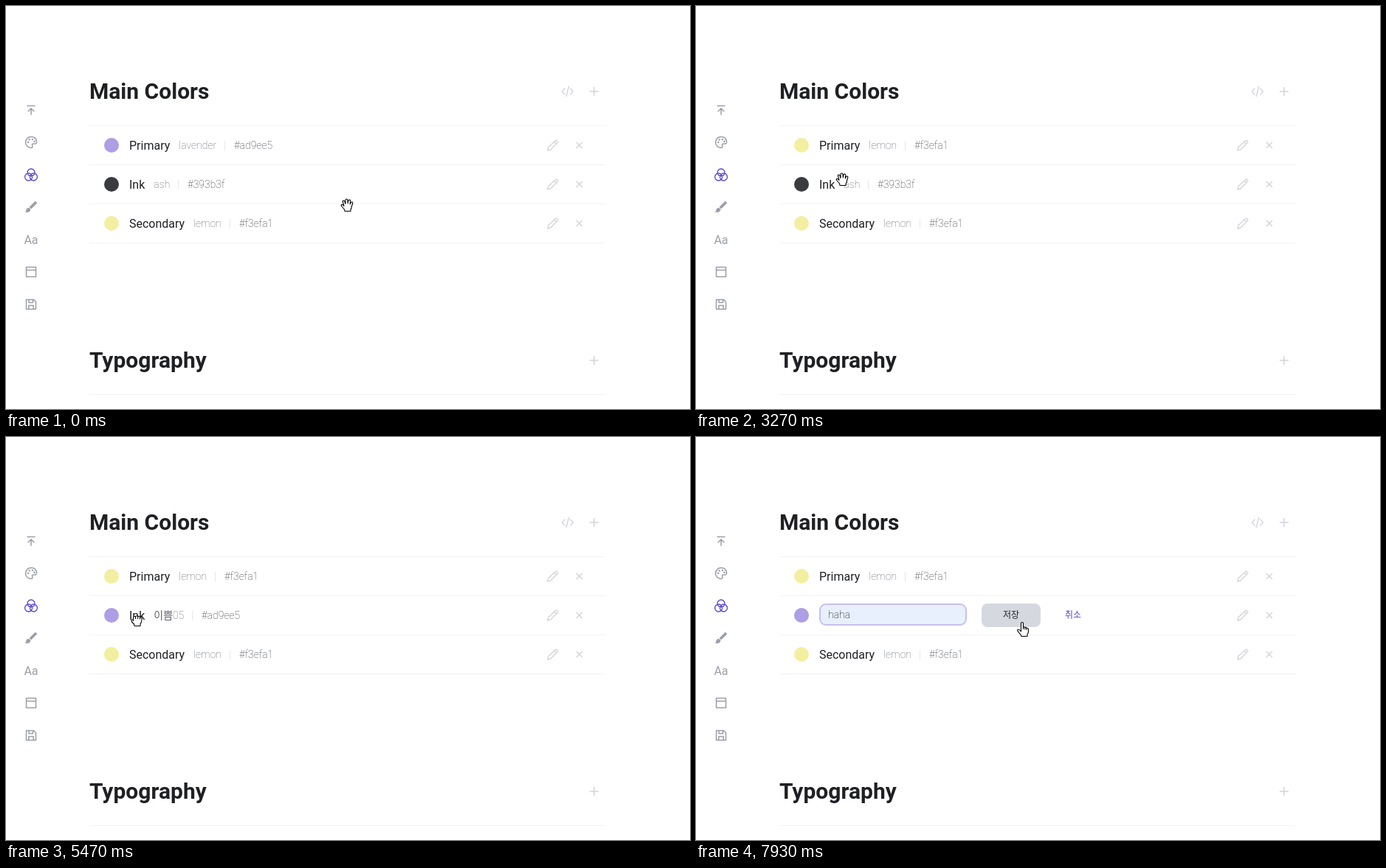
Recreate the animation shown at these times as an HTML page with a canvas. Size 927 by 547 pixels, loop 8000 ms.

```html
<!DOCTYPE html>
<html lang="en">
<head>
<meta charset="utf-8">
<title>Main Colors</title>
<style>
html, body { margin: 0; width: 100%; height: 100%; overflow: hidden; background: #fff; }
canvas { display: block; }
</style>
</head>
<body>
<canvas id="stage" width="927" height="547"></canvas>
<script>
const ctx = document.getElementById('stage').getContext('2d');
const LOOP = 8000, STEP = 1000 / 15;
const LAVENDER = '#ad9ee5', ASH = '#393b3f', LEMON = '#f3efa1', VIOLET = '#5344cf';
const ICON = '#9c9ea7', PALE = '#d3d5db', RULE = '#f3f3f5';
const SANS = 'Roboto, "Noto Sans CJK KR", "Noto Sans CJK", sans-serif';
const MENU = '"Open Sans", "Noto Sans CJK KR", "Noto Sans CJK", sans-serif';
const SWATCHES = [LAVENDER, ASH, LEMON, LEMON, '#5a9a90', ASH, '#686e93', LAVENDER];
const ENTRIES = ['haha', 'Warning', 'vava', 'dfads', 'hahaha', 'pink'];
const PANEL_H = 64;

// Pointer hotspot: time, x, y
const PATH = [
  [0, 462, 270], [67, 462, 270], [200, 455, 270], [333, 455, 270], [600, 285, 213],
  [800, 161, 188], [867, 156, 201], [1000, 156, 201], [1067, 155, 201], [1533, 155, 201],
  [1900, 193, 228], [2200, 223, 246], [2733, 223, 246], [2933, 216, 252], [3200, 202, 239],
  [3400, 189, 226], [3600, 184, 229], [3800, 174, 242], [4133, 174, 242], [4333, 245, 273],
  [4600, 371, 299], [4733, 373, 301], [5000, 215, 286], [5400, 177, 248], [6200, 177, 248],
  [6467, 199, 269], [6733, 232, 292], [6800, 232, 292], [6867, 231, 292], [7333, 231, 292],
  [7600, 350, 267], [7800, 441, 251], [8000, 441, 251]
];

const CURSORS = {
  hand: { dx: -8.5, dy: -9,
    body: 'M5.5 17.5L5 15L1.5 11Q0 9 1.5 8.5Q3 8.3 4.5 10.5L3 5Q2.6 3 4 3Q5.2 3 5.6 4.5L6.5 7.5V2.5Q6.6 1 8 1Q9.4 1 9.5 2.5L9.8 7L10.5 3Q11 1.8 12.2 2Q13.4 2.3 13.2 3.8L12.8 8L14 5.6Q15 4.6 15.9 5.2Q16.6 5.8 16.2 7L15 11Q15 13.5 13.5 15.5V17.5Z' },
  grab: { dx: -8.5, dy: -9,
    body: 'M5.5 17.5L5 15L2 12Q.8 9.6 2.5 9L4 9.4V6Q4.2 4.5 5.5 4.5Q6.5 4.3 7 5Q7.6 3.6 8.8 3.8Q9.8 3.9 10.2 4.8Q11 4 12.2 4.4Q13 4.8 13.1 5.8Q14.5 5.2 15.3 6.2Q15.8 7 15.5 9L15 12L13.5 15V17.5Z',
    detail: 'M7 5V8M10.2 5V8M13.1 6V8.5M4 9V11' },
  point: { dx: -6, dy: 0,
    body: 'M5.5 2Q5.5 .5 7 .5Q8.5 .5 8.5 2V7Q9.8 6.3 10.8 7.6Q12 7 13 8.4Q14.8 8 15.5 9.5V13Q15.5 15 14 17V19.5H6L5.5 18L1.2 12.6Q0 10.8 1.6 10.2Q3 10 5.5 12.8Z',
    detail: 'M8.5 7V10M10.8 8V10.5M13 9V11' },
  arrow: { dx: 0, dy: 0, body: 'M.5 .5V16.5L4.2 13L6.7 18.5L9 17.5L6.6 12H11.5Z' },
  beam: { dx: -3.5, dy: -8, detail: 'M0 .5H3M4 .5H7M3.5 1V15M0 15.5H3M4 15.5H7' }
};

function position(t) {
  const i = Math.max(1, PATH.findIndex(p => p[0] >= t));
  const [t0, x0, y0] = PATH[i - 1], [t1, x1, y1] = PATH[i];
  const k = (t - t0) / (t1 - t0);
  return { x: Math.round(x0 + (x1 - x0) * k), y: Math.round(y0 + (y1 - y0) * k) };
}

function text(s, x, y, font, color, align = 'left') {
  ctx.font = font;
  ctx.fillStyle = color;
  ctx.textAlign = align;
  ctx.fillText(s, x, y);
  return ctx.measureText(s).width;
}

function rect(x, y, w, h, color) {
  ctx.fillStyle = color;
  ctx.fillRect(x, y, w, h);
}

function box(x, y, w, h, r, color) {
  ctx.beginPath();
  ctx.roundRect(x, y, w, h, r);
  ctx.fillStyle = color;
  ctx.fill();
}

function disc(x, y, r, color) {
  ctx.beginPath();
  ctx.arc(x, y, r, 0, Math.PI * 2);
  ctx.fillStyle = color;
  ctx.fill();
}

function icon(x, y, d, color, width = 1.5, fill) {
  ctx.save();
  ctx.translate(x, y);
  const shape = new Path2D(d);
  if (fill) {
    ctx.fillStyle = fill;
    ctx.fill(shape);
  }
  ctx.strokeStyle = color;
  ctx.lineWidth = width;
  ctx.lineJoin = 'round';
  ctx.stroke(shape);
  ctx.restore();
}

const ring = (x, y, r) => `M${x - r} ${y}a${r} ${r} 0 1 0 ${2 * r} 0a${r} ${r} 0 1 0 ${-2 * r} 0`;
const plus = y => icon(797, y, 'M-6 0H6M0 -6V6', PALE);

function sidebar() {
  const x = 34;
  icon(x, 141, 'M-5.5 -5.5H5.5M0 6.8V-2M-4.3 2.3L0 -2L4.3 2.3', ICON);
  icon(x, 185, 'M0 -7.5A7.5 7.5 0 0 0 0 7.5C2.3 7.5 2.1 5.4 1.5 4.2C.9 2.8 2 2 3.4 2H5.4C7 2 7.8 .6 7.5 -1C7 -5 4 -7.5 0 -7.5Z', ICON);
  for (const [dx, dy] of [[-4, 0], [-2.4, -3.6], [1.8, -4], [4.4, -1.3]]) disc(x + dx, 185 + dy, 1.2, ICON);
  icon(x, 229, ring(0, -3, 5) + ring(-3.4, 3, 5) + ring(3.4, 3, 5), VIOLET, 1.3);
  icon(x, 273, 'M-1.2 1.2L7 -7', ICON, 3.6);
  icon(x, 273, 'M-4.8 1.5Q-2 .8 -1 3.4Q-1.6 7.4 -7.6 6.6Q-6 5.4 -6.2 3.4Q-6 2 -4.8 1.5Z', ICON, .8, ICON);
  text('Aa', x, 323, '16px ' + SANS, ICON, 'center');
  icon(x, 361, 'M-6.5 -6.5H6.5V6.5H-6.5ZM-6.5 -2.5H6.5', ICON);
  icon(x, 405, 'M-6.5 -6.5H3.5L6.5 -3.5V6.5H-6.5ZM-3 -6.5V-2.5H2.5V-6.5M-3.2 6.5V1.5H3.2V6.5', ICON);
}

function colorRow(y, [title, name, hex, color], editing) {
  disc(143, y, 10, color);
  icon(741, y, 'M-7 7L-6 2.8L3.6 -6.3Q4.6 -7.2 5.7 -6.2L6.4 -5.4Q7.4 -4.4 6.4 -3.4L-3 6ZM2 -4.8L4.8 -1.9', PALE, 1.4);
  icon(777, y, 'M-4 -4L4 4M4 -4L-4 4', PALE);
  if (editing) return;
  let x = 167 + text(title, 167, y + 6, '16px ' + SANS, '#1f2024') + 12;
  x += text(name, x, y + 5, '100 14px ' + SANS, '#5f626c') + 11;
  rect(Math.round(x), y - 6, 1, 13, '#e6e7eb');
  text(hex, Math.round(x) + 13, y + 5, '100 14px ' + SANS, '#33353b');
}

function panel(y) {
  rect(113, y, 700, PANEL_H, '#fafafa');
  SWATCHES.forEach((c, i) => disc(155 + 31 * i, y + 32, 10, c));
}

function editor(t, s) {
  box(167, 226, 200, 30, 9, '#c9bfee');
  box(169, 228, 196, 26, 7, s.filled ? '#e8f0fe' : '#fff');
  if (s.filled) {
    text('haha', 179, 246, s.menu ? '13px ' + MENU : '100 14px ' + SANS, s.menu ? '#111' : '#000');
  }
  const since = t - (s.menu ? 5933 : 7133);
  if (Math.floor(since / 500) % 2 === 0) rect(s.menu ? 179 : 208, 233, 1, 16, '#000');
  box(387, 226, 80, 32, 8, s.onSave ? '#d5d8df' : '#f2f3f5');
  text('저장', 427, 246, '300 12px ' + SANS, '#222', 'center');
  text('취소', 511, 246, '300 12px ' + SANS, VIOLET, 'center');
}

function menu(hover) {
  ctx.save();
  ctx.shadowColor = 'rgba(0,0,0,.32)';
  ctx.shadowBlur = 16;
  ctx.shadowOffsetY = 4;
  box(167, 256, 320, 235, 3, '#4a4a4a');
  ctx.restore();
  text('저장된 데이터', 182, 274, '12px ' + MENU, '#dedede');
  if (hover) {
    box(171, 283, 278, 34, 2, '#747474');
    icon(466, 300, 'M-7 -5.5H7M-2.5 -5.5V-7.5H2.5V-5.5M-5.5 -5.5L-4.6 7.5H4.6L5.5 -5.5M-1.7 -2.5V4.5M1.7 -2.5V4.5', '#d0d0d0', 1);
  }
  ENTRIES.forEach((e, i) => text(e, 180, 305 + 34 * i, '600 11px ' + MENU, '#fff'));
}

function cursor(kind, x, y) {
  const c = CURSORS[kind];
  if (c.body) icon(x + c.dx, y + c.dy, c.body, '#000', 1.1, '#fff');
  if (c.detail) icon(x + c.dx, y + c.dy, c.detail, '#000', 1);
}

function state(t) {
  const p = position(t), within = (a, b) => t >= a && t < b;
  const s = { ...p, open: -1, editing: t >= 5930, menu: within(5930, 7130) };
  if (within(1260, 2260)) s.open = 0;
  if (within(3930, 4730) || within(5660, 5860)) s.open = 1;
  s.hover = s.menu && p.y >= 283;
  s.filled = s.hover || t >= 7130;
  s.onSave = s.editing && p.x >= 387 && p.x < 467 && p.y >= 226 && p.y < 258;
  s.kind = 'hand';
  if (within(5460, 5930)) s.kind = 'grab';
  else if (s.menu) s.kind = p.y < 256 ? 'beam' : 'arrow';
  else if (s.onSave) s.kind = 'point';
  else if (s.open >= 0) {
    const cy = 247 + 53 * s.open;
    if (SWATCHES.some((c, i) => Math.hypot(p.x - 155 - 31 * i, p.y - cy) < 10)) s.kind = 'point';
  }
  return s;
}

function draw(t) {
  const s = state(t);
  const rows = [
    t < 2260 ? ['Primary', 'lavender', '#ad9ee5', LAVENDER] : ['Primary', 'lemon', '#f3efa1', LEMON],
    t < 4730 ? ['Ink', 'ash', '#393b3f', ASH] : ['Ink', '이쁨05', '#ad9ee5', LAVENDER],
    ['Secondary', 'lemon', '#f3efa1', LEMON]
  ];
  rect(0, 0, 927, 547, '#fff');
  sidebar();

  text('Main Colors', 113, 126, 'bold 30px ' + SANS, '#1f2024');
  icon(761, 116, 'M-3.5 -4.5L-7.5 0L-3.5 4.5M3.5 -4.5L7.5 0L3.5 4.5M1.8 -7L-1.8 7', PALE, 1.4);
  plus(116);
  rect(113, 162, 700, 1, RULE);

  let y = 162;
  rows.forEach((row, i) => {
    colorRow(y + 27, row, s.editing && i === 1);
    y += 53;
    if (s.open === i) {
      panel(y);
      y += PANEL_H;
    }
    rect(113, y, 700, 1, RULE);
  });

  text('Typography', 113, y + 170, 'bold 30px ' + SANS, '#1f2024');
  plus(y + 160);
  rect(113, y + 206, 700, 1, RULE);

  if (s.editing) editor(t, s);
  if (s.menu) menu(s.hover);
  cursor(s.kind, s.x, s.y);
}

// Screen updates come 15 times a second.
function tick() {
  const t = performance.now() % LOOP;
  draw(Math.min(LOOP - 1, Math.floor((t + 5) / STEP) * STEP));
  requestAnimationFrame(tick);
}
tick();
</script>
</body>
</html>
```
